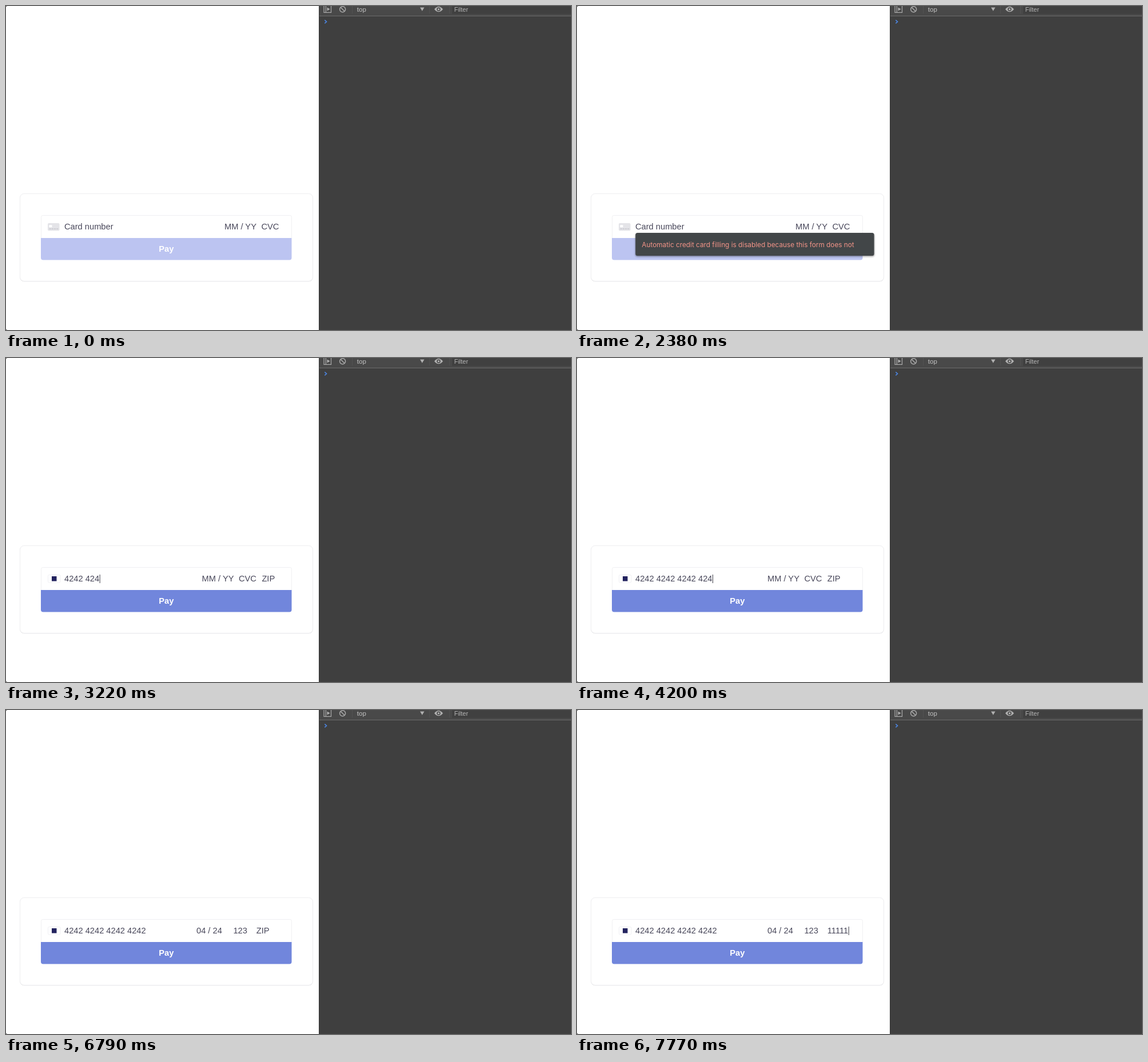
Recreate the animation shown at these times as an HTML page. Size 988x567 px, loop 8 s.

```html
<!DOCTYPE html>
<html lang="en">
<head>
<meta charset="utf-8">
<title>Card form</title>
<style>
  html, body { margin: 0; width: 100%; height: 100%; overflow: hidden; background: #fff; }
  svg { display: block; width: 100vw; height: 100vh; }
  text { white-space: pre; font-family: "Liberation Sans", Arial, sans-serif; }
  .field text { font-size: 14.66px; fill: #48475a; }
  .bar text { fill: #b4b4b4; }
</style>
</head>
<body>
<svg viewBox="0 0 988 567">
  <defs>
    <clipPath id="inner"><rect x="62" y="367" width="426" height="38"/></clipPath>
    <filter id="soft" x="-5%" y="-20%" width="110%" height="150%"><feGaussianBlur stdDeviation="1.6"/></filter>
  </defs>
  <rect width="988" height="567" fill="#fff"/>
  <path d="M0 0h2L0 2zM0 567v-2l2 2z" fill="#777"/>

  <rect x="24.5" y="329.3" width="512" height="153" rx="7" fill="#dcdcdf"/>
  <rect x="24.5" y="328.5" width="512" height="153" rx="7" fill="#fff" stroke="#ededef"/>
  <path d="M61.5 406V369.500q0-3 3-3H496.500q3 0 3 3V406" fill="#fff" stroke="#f0f0f2"/>
  <path id="button" d="M61 406H499.500V440.500q0 4-4 4H65q-4 0-4-4z"/>
  <text x="280.300" y="430" font-size="14.660" font-weight="700" fill="#fff" text-anchor="middle">Pay</text>

  <g id="blank">
    <rect x="73" y="380" width="20.500" height="13.300" rx="2" fill="#e4e4e8"/>
    <rect x="75.300" y="383.300" width="5.200" height="4" rx="1" fill="#fff"/>
    <path d="M75.500 390H91.500" stroke="#c6c6cd" stroke-width="1.600" stroke-dasharray="3.200 1"/>
  </g>
  <g id="brand">
    <rect x="73.500" y="379.500" width="21.500" height="13.500" rx="2" fill="#fff" stroke="#f0f0f3"/>
    <rect x="80" y="382" width="8.500" height="8.500" fill="#23235f"/>
  </g>
  <g class="field" clip-path="url(#inner)">
    <text id="number" x="102" y="391.400"></text>
    <g id="extras">
      <text id="expiry" x="333" y="391.400"></text>
      <text id="cvc" x="397.400" y="391.400"></text>
      <text id="zip" x="437.800" y="391.400"></text>
    </g>
    <rect id="caret" y="379" width="1" height="15" fill="#3c3c46"/>
  </g>

  <g id="tip">
    <rect x="102" y="398.500" width="418" height="40" rx="4" fill="#000" opacity=".4" filter="url(#soft)"/>
    <rect x="102.300" y="397" width="417.200" height="40" rx="3.500" fill="#424648"/>
    <text x="113.300" y="421.700" fill="#f39488" style="font: 11.8px Inter, sans-serif">Automatic credit card filling is disabled because this form does not</text>
  </g>

  <g class="bar">
    <rect x="547" width="441" height="567" fill="#3f3f3f"/>
    <rect x="547" width="441" height="17" fill="#494949"/>
    <rect x="780" width="208" height="14" fill="#404040"/>
    <path d="M547 17.500H988" stroke="#6c6c6c"/>
    <path d="M547.500 0V567" stroke="#393939"/>
    <path d="M605.500 0V13M740.500 0V13M775.500 0V13" stroke="#525252"/>
    <g fill="none" stroke="#a9a9a9" stroke-width="1.200">
      <path d="M556 -1H568.500V11.400H556zM559.300 -1V11.400"/>
      <circle cx="588.600" cy="5.800" r="5" stroke-width="1.500"/>
      <path d="M585.200 2.400L592 9.200" stroke-width="1.500"/>
    </g>
    <path d="M561.500 2.500L566.500 5.500L561.500 8.500zM724 2.500H731.500L727.750 8.800z" fill="#b0b0b0"/>
    <path d="M749 5.700Q756.500 -3.500 764 5.700Q756.500 15 749 5.700z" fill="#b0b0b0"/>
    <circle cx="756.500" cy="5.700" r="3.200" fill="#484848"/>
    <circle cx="756.500" cy="5.700" r="1.700" fill="#b0b0b0"/>
    <text x="613.800" y="9.700" font-size="11.500" style="fill:#c4c4c4">top</text>
    <text x="783.700" y="10" font-size="11">Filter</text>
    <path d="M557.300 24.700L560.500 27.500L557.300 30.300" fill="none" stroke="#4c86e4" stroke-width="1.600"/>
  </g>
</svg>
<script>
const LOOP = 8000, FOCUS = 1470, BLINK = 480;
const DIGITS = "4242424242424242" + "0424" + "123" + "11111";
const KEYS = [
  2450, 2590, 2730, 2800, 2940, 3080, 3150, 3290, 3430, 3500, 3710, 3780, 3920, 3990, 4130, 4270,
  4340, 4410, 4550, 4900,
  6020, 6160, 6230,
  7070, 7280, 7420, 7630, 7760
];
const ENDS = [16, 20, 23, 28];
const $ = id => document.getElementById(id);
const fields = ["number", "expiry", "cvc", "zip"].map($);
const hints = ["Card number", "MM / YY", "CVC", "ZIP"];

const span = (t, from, to) => Math.min(1, Math.max(0, (t - from) / (to - from)));
const mix = (a, b, p) => `rgb(${a.map((v, i) => Math.round(v + (b[i] - v) * p))})`;
const show = (id, alpha) => $(id).setAttribute("opacity", alpha);

// cubic-bezier(.25, .1, .25, 1)
function ease(x) {
  let lo = 0, hi = 1;
  const bez = (s, a, b) => 3 * s * (1 - s) ** 2 * a + 3 * s * s * (1 - s) * b + s ** 3;
  for (let i = 0; i < 20; i++) {
    const mid = (lo + hi) / 2;
    if (bez(mid, .25, .25) < x) lo = mid; else hi = mid;
  }
  return bez(lo, .1, 1);
}

function values(n) {
  const d = DIGITS.slice(0, n), exp = d.slice(16, 20);
  return [
    d.slice(0, 16).replace(/(\d{4})(?=\d)/g, "$1 "),
    exp.length < 2 ? exp : exp.slice(0, 2) + " / " + exp.slice(2),
    d.slice(20, 23),
    d.slice(23)
  ];
}

function drawCaret(t, n, typed, shift) {
  // Focus hops to the next field shortly after one is full.
  const hop = n < 28 && ENDS.includes(n);
  const since = n ? KEYS[n - 1] + (hop ? 70 : 0) : FOCUS;
  const at = ENDS.findIndex(end => (t < since ? n - 1 : n) < end);
  const i = at < 0 ? 3 : at;
  const width = typed[i] ? fields[i].getComputedTextLength() : 0;
  const x = +fields[i].getAttribute("x") + width + .5 + (i ? shift : 0);
  const on = t >= FOCUS && (t < since || Math.floor((t - since) / BLINK) % 2 === 0);
  $("caret").setAttribute("x", x);
  show("caret", on ? 1 : 0);
}

function draw(t) {
  const n = KEYS.filter(k => k <= t).length;
  const typed = values(n);
  fields.forEach((f, i) => {
    const s = typed[i] || hints[i];
    if (f.textContent !== s) f.textContent = s;
  });

  const shift = 49 * (1 - ease(span(t, 2940, 3500)));
  $("extras").setAttribute("transform", `translate(${shift})`);
  show("zip", t < 2940 ? 0 : 1);
  drawCaret(t, n, typed, shift);

  $("button").setAttribute("fill", mix([188, 196, 241], [113, 134, 220], span(t, 2450, 2630)));
  show("blank", t < KEYS[0] ? 1 : 0);
  show("brand", span(t, 2560, 2730));
  show("tip", t >= 2030 && t < 2660 ? 1 : 0);
}

function tick() {
  draw(performance.now() % LOOP);
  requestAnimationFrame(tick);
}
tick();
</script>
</body>
</html>
```
